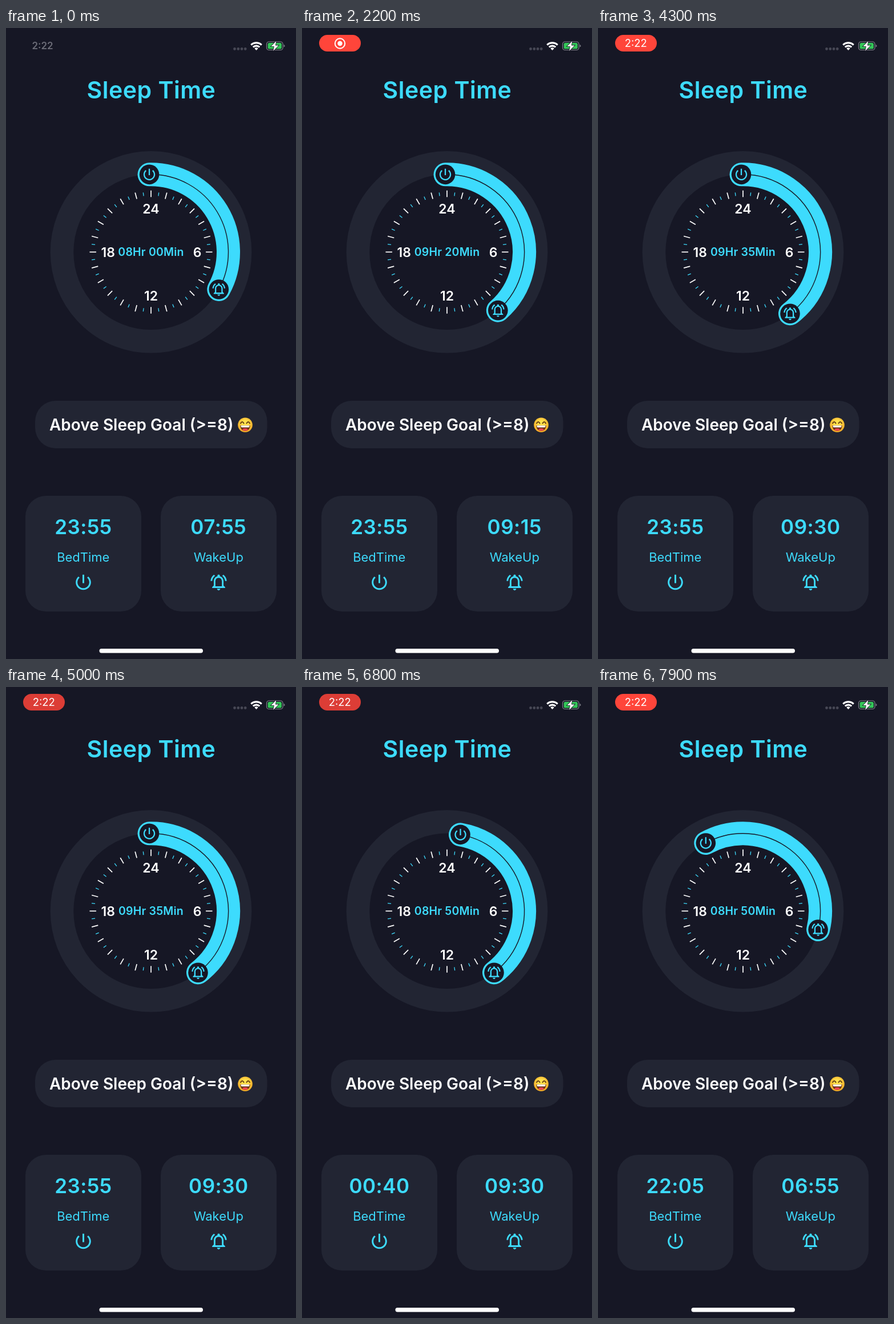
Recreate the animation shown at these times as an HTML page. Size 508x1102 px, loop 8000 ms.

```html
<!DOCTYPE html>
<html lang="en">
<head>
<meta charset="utf-8">
<title>Sleep Time</title>
<style>
  html, body { margin: 0; width: 100%; height: 100%; overflow: hidden; background: #161725; }
  svg { display: block; width: 100vw; height: 100vh; font-family: Inter, "Open Sans", sans-serif; }
  text { text-anchor: middle; font-weight: 600; fill: #fff; }
  .panel { fill: #222533; }
  .cyan { fill: #3ddbfd; }
  .title { font-size: 41px; letter-spacing: .5px; }
  .hour { font-size: 23px; }
  .span { font-size: 19.5px; letter-spacing: .2px; }
  .goal { font-size: 28px; text-anchor: start; }
  .time { font-size: 35px; letter-spacing: .5px; }
  .label { font-size: 22px; font-weight: 400; }
</style>
</head>
<body>
<svg viewBox="0 0 508 1102">
  <defs>
    <path id="power" d="M13 3h-2v10h2V3zm4.83 2.17l-1.42 1.42C17.99 7.86 19 9.81 19 12c0 3.87-3.13 7-7 7s-7-3.13-7-7c0-2.19 1.01-4.14 2.58-5.42L6.17 5.17C4.23 6.82 3 9.26 3 12c0 4.97 4.03 9 9 9s9-4.03 9-9c0-2.74-1.23-5.18-3.17-6.83z" transform="translate(-12 -12)"/>
    <path id="bell" d="M12 22c1.1 0 2-.9 2-2h-4c0 1.1.9 2 2 2zm6-6v-5c0-3.07-1.63-5.64-4.5-6.32V4c0-.83-.67-1.5-1.5-1.5s-1.5.67-1.5 1.5v.68C7.64 5.36 6 7.92 6 11v5l-2 2v1h16v-1l-2-2zm-2 1H8v-6c0-2.48 1.51-4.5 4-4.5s4 2.02 4 4.5v6zM7.58 4.08L6.15 2.65C3.75 4.48 2.17 7.3 2.03 10.5h2c.15-2.65 1.51-4.97 3.55-6.42zm12.39 6.42h2c-.15-3.2-1.73-6.02-4.12-7.85l-1.42 1.43c2.02 1.45 3.39 3.77 3.54 6.42z" transform="translate(-12 -12)"/>
    <radialGradient id="face" cx=".5" cy=".4" r=".6">
      <stop offset=".3" stop-color="#ffe14d"/>
      <stop offset="1" stop-color="#f5a623"/>
    </radialGradient>
  </defs>
  <rect width="508" height="1102" fill="#161725"/>

  <!-- status bar -->
  <text id="clock" x="64" y="37" font-size="17" style="fill:#6b6c77">2:22</text>
  <g id="pill">
    <rect x="30" y="12" width="73" height="29" rx="14.5" fill="#ff453a" id="pillBody"/>
    <g id="record">
      <circle cx="66.5" cy="27" r="8.7" fill="none" stroke="#fff" stroke-width="2"/>
      <circle cx="66.5" cy="27" r="4.2" fill="#fff"/>
    </g>
    <text id="pillClock" x="66.3" y="33" font-size="18.5" style="font-weight:400">2:22</text>
  </g>
  <g fill="#474855">
    <circle cx="400.5" cy="36.5" r="2.4"/><circle cx="406.8" cy="36.5" r="2.4"/>
    <circle cx="413" cy="36.5" r="2.4"/><circle cx="419.2" cy="36.5" r="2.4"/>
  </g>
  <g fill="none" stroke="#fff" stroke-width="3.1">
    <path d="M429.3 29.6a13.2 13.2 0 0 1 18.4 0"/>
    <path d="M432.8 33.4a8.3 8.3 0 0 1 11.4 0"/>
    <path d="M438.5 39l-3.2-3.3a4.7 4.7 0 0 1 6.4 0z" fill="#fff" stroke="none"/>
  </g>
  <rect x="456.5" y="24" width="28.5" height="14.5" rx="4.3" fill="none" stroke="#82838c" stroke-width="1.2"/>
  <rect x="458.6" y="26" width="24.2" height="10.5" rx="2.6" fill="#34c759"/>
  <path d="M486.6 28.8q1.8 .6 1.8 2.4t-1.8 2.4z" fill="#82838c"/>
  <path d="M473.4 22.8l-9 9.2h5.4l-1.6 8 9.2-9.6h-5.6z" fill="#fff" stroke="#161725" stroke-width="1.6" paint-order="stroke"/>

  <text class="title cyan" x="254.5" y="123">Sleep Time</text>

  <!-- dial -->
  <circle cx="254" cy="391.3" r="156" fill="none" stroke="#222533" stroke-width="40.6"/>
  <g id="ticks" transform="translate(254 391.3)"></g>
  <text class="hour" x="254" y="323.5">24</text>
  <text class="hour" x="335" y="399.7">6</text>
  <text class="hour" x="254" y="475.5">12</text>
  <text class="hour" x="178.8" y="399.7">18</text>
  <text class="span cyan" id="span" x="254" y="398"></text>
  <g transform="translate(254 391.3)" fill="none">
    <path id="arc" stroke="#3ddbfd" stroke-width="41" stroke-linecap="round"/>
    <path id="thread" stroke="#161725" stroke-width="1.4"/>
    <g id="bedKnob"><circle r="17.3" fill="#161725"/><use href="#power" class="cyan" transform="scale(1.13)"/></g>
    <g id="wakeKnob"><circle r="17.3" fill="#161725"/><use href="#bell" class="cyan" transform="scale(1.13)"/></g>
  </g>

  <!-- goal -->
  <rect class="panel" x="51" y="651" width="406.5" height="83" rx="36"/>
  <text class="goal" x="76" y="703">Above Sleep Goal (&gt;=8)</text>
  <g transform="translate(419 693.3)">
    <circle r="12.8" fill="url(#face)"/>
    <path d="M-8-2.8q2.8-5.4 5.6 0M2.4-2.8q2.8-5.4 5.6 0" fill="none" stroke="#5b3410" stroke-width="1.7" stroke-linecap="round"/>
    <path d="M-8.6 .6h17.2c0 6-3.6 9.6-8.6 9.6s-8.6-3.6-8.6-9.6z" fill="#6a2f12"/>
    <path d="M-7.7 .9h15.4q-.2 2.9-1.4 3.3h-12.6q-1.2-.4-1.4-3.3z" fill="#fff"/>
    <ellipse cy="8" rx="4.6" ry="2" fill="#ee4550"/>
  </g>

  <!-- cards -->
  <rect class="panel" x="34" y="817" width="203" height="202" rx="36"/>
  <rect class="panel" x="271" y="817" width="203" height="202" rx="36"/>
  <text class="time cyan" id="bedTime" x="135.5" y="883.5"></text>
  <text class="time cyan" id="wakeTime" x="372.3" y="883.5"></text>
  <text class="label cyan" x="135.3" y="932">BedTime</text>
  <text class="label cyan" x="372.3" y="932">WakeUp</text>
  <use href="#power" class="cyan" transform="translate(135.5 968) scale(1.48)"/>
  <use href="#bell" class="cyan" transform="translate(372.5 968) scale(1.42)"/>

  <rect x="163.5" y="1084" width="181.5" height="7.4" rx="3.7" fill="#fff"/>
</svg>
<script>
  const LOOP = 8000, STEP = 100, R = 135.5;
  const $ = id => document.getElementById(id);

  // [ms, minutes from midnight]
  const bedKeys = [[0, -5], [5300, -5], [5600, 0], [6500, 40], [6800, 40], [7900, -115]];
  const wakeKeys = [[0, 475], [1700, 475], [2900, 685], [3200, 685], [4200, 570], [6800, 570], [7900, 415]];

  const clamp = x => Math.min(1, Math.max(0, x));
  const ramp = (t, a, b) => clamp((t - a) / (b - a));
  const smooth = x => x * x * (3 - 2 * x);

  // eased position between keys, snapped to five minutes
  function valueAt(keys, t) {
    let i = keys.length - 1;
    while (i > 0 && keys[i][0] > t) i--;
    const [t0, v0] = keys[i];
    const [t1, v1] = keys[i + 1] || [LOOP, v0];
    return Math.round((v0 + (v1 - v0) * smooth(ramp(t, t0, t1))) / 5) * 5;
  }

  const pad = n => String(n).padStart(2, "0");
  const clockText = m => {
    if (m === 0) return "24:00";
    const d = (m + 1440) % 1440;
    return pad(Math.floor(d / 60)) + ":" + pad(d % 60);
  };
  const point = m => {
    const a = m / 1440 * 2 * Math.PI;
    return [R * Math.sin(a), -R * Math.cos(a)].map(v => v.toFixed(2));
  };

  function addTicks() {
    let out = "";
    for (let i = 0; i < 48; i++) {
      const long = i % 2 === 0;
      out += `<path d="M0 ${long ? -107.5 : -104.8}V${long ? -96 : -98.8}" transform="rotate(${i * 7.5})"
        stroke="${long ? "#fff" : "#3ddbfd"}" stroke-width="${long ? 1.7 : 1.3}"/>`;
    }
    $("ticks").innerHTML = out;
  }

  function drawDial(t) {
    const bed = valueAt(bedKeys, t), wake = valueAt(wakeKeys, t), len = wake - bed;
    const p = point(bed), q = point(wake);
    const d = `M${p}A${R} ${R} 0 ${len > 720 ? 1 : 0} 1 ${q}`;
    $("arc").setAttribute("d", d);
    $("thread").setAttribute("d", d);
    $("bedKnob").setAttribute("transform", `translate(${p})`);
    $("wakeKnob").setAttribute("transform", `translate(${q})`);
    $("span").textContent = `${pad(Math.floor(len / 60))}Hr ${pad(len % 60)}Min`;
    $("bedTime").textContent = clockText(bed);
    $("wakeTime").textContent = clockText(wake);
  }

  function drawPill(t) {
    const shown = ramp(t, 100, 500), swap = ramp(t, 3000, 3500);
    const pulse = clamp(.65 - .65 * Math.cos((t - 3100) / 1850 * 2 * Math.PI));
    $("clock").style.opacity = 1 - shown;
    $("pill").style.opacity = shown;
    $("pillBody").style.opacity = .85 + .15 * pulse;
    $("record").style.opacity = 1 - swap;
    $("pillClock").style.opacity = swap;
  }

  function frame() {
    const t = Math.floor(performance.now() % LOOP / STEP) * STEP;
    drawDial(t);
    drawPill(t);
    requestAnimationFrame(frame);
  }

  addTicks();
  frame();
</script>
</body>
</html>
```
